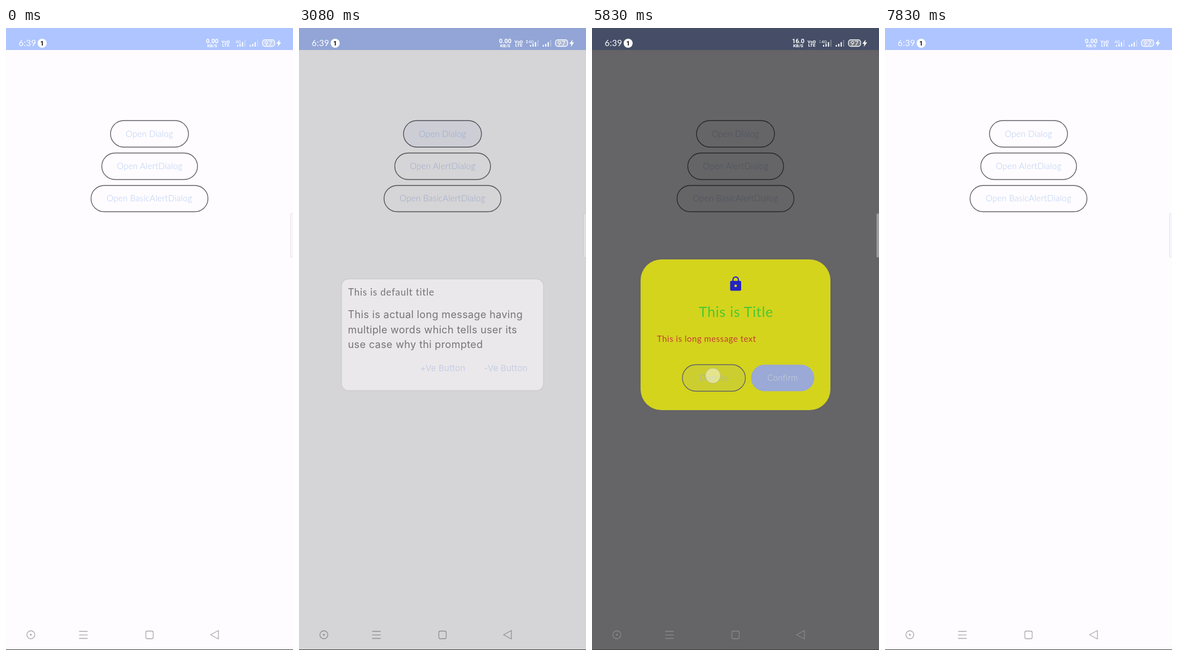
Write an HTML page that moves like this. It is 508 px wide and 1102 px high and loops after 8000 ms.

```html
<!DOCTYPE html>
<html lang="en">
<head>
<meta charset="utf-8">
<title>Dialogs</title>
<style>
  html, body { margin: 0; width: 100%; height: 100%; overflow: hidden; background: #fefcff; }
  svg { display: block; width: 508px; height: 1102px; }
  text { font: 300 15px Lato, "Open Sans", sans-serif; letter-spacing: .25px; }
  .mid { text-anchor: middle; }
  .label { fill: #b5caf1; }
  .title { font-size: 17px; font-weight: 400; letter-spacing: .75px; fill: #222126; }
  .body { font: 400 18px Inter, sans-serif; letter-spacing: .37px; fill: #252429; }
  .flat { font: 400 15px Inter, sans-serif; letter-spacing: .2px; fill: #b3c8f3; }
  .big { font-size: 25px; font-weight: 400; letter-spacing: .7px; fill: #40ee20; }
  .msg { letter-spacing: .5px; fill: #e53320; font-weight: 400; }
  .tiny { font: 700 8px Roboto, sans-serif; letter-spacing: 0; }
  .speed { font: 700 11px Roboto, sans-serif; letter-spacing: 0; }
  .line { fill: none; stroke: #626067; stroke-width: 1.4; }
  .nav { fill: none; stroke-width: 1.3; }
</style>
</head>
<body>
<svg id="stage" viewBox="0 0 508 1102"></svg>
<script>
const LOOP = 8000;
const stage = document.getElementById("stage");
const $ = id => document.getElementById(id);
const clamp = v => Math.max(0, Math.min(1, v));
const ramp = (t, start, length) => clamp((t - start) / length);

// x, y, width, height of every button
const buttons = {
  open: [185, 164, 138, 47],
  alert: [169.5, 221.5, 169.5, 47],
  basic: [150.5, 279, 207, 46.5],
  plus: [200, 579, 109, 48],
  minus: [313, 579, 107, 48],
  dismiss: [160, 596.5, 111.5, 47],
  confirm: [281.5, 596.5, 112, 47]
};

const pill = (name, attrs = "") => {
  const [x, y, w, h] = buttons[name];
  return `<rect x="${x}" y="${y}" width="${w}" height="${h}" rx="${h / 2}" ${attrs}/>`;
};
const text = (x, y, cls, str, attrs = "") =>
  `<text x="${x}" y="${y}" class="${cls}" ${attrs}>${str}</text>`;
const ripple = name =>
  `<clipPath id="clip-${name}">${pill(name)}</clipPath>
   <g clip-path="url(#clip-${name})"><circle id="ripple-${name}" fill="#8fb0ee" opacity="0"/></g>`;
const outlined = (name, label) => {
  const [x, y, w, h] = buttons[name];
  return ripple(name) + pill(name, 'class="line"') +
    text(x + w / 2, y + h / 2 + 5, "mid label", label);
};
const bars = (x, faint) => [3, 5, 8, 12].map((h, i) =>
  `<rect x="${x + i * 4.3}" y="${33 - h}" width="2" height="${h}" opacity="${i < faint ? 1 : .3}"/>`).join("");

const navIcons = `
  <circle cx="44" cy="1075" r="7"/><circle cx="44" cy="1075" r="1"/>
  <path d="M129.500 1069h15M129.500 1075.300h15M129.500 1081.500h15"/>
  <rect x="247.500" y="1068.500" width="13" height="13.500" rx="2.500"/>
  <path d="M376 1067.500V1082.500L362 1075Z" stroke-linejoin="round"/>`;

stage.innerHTML = `
  <rect width="508" height="1102" fill="#fefcff"/>
  <rect width="508" height="39" fill="#aec5ff"/>
  ${outlined("open", "Open Dialog")}
  ${outlined("alert", "Open AlertDialog")}
  ${outlined("basic", "Open BasicAlertDialog")}
  <g id="nav-dark" class="nav" stroke="#aaa8ad">${navIcons}</g>
  <rect id="dim" width="508" height="1102" opacity="0"/>
  <g id="nav-light" class="nav" stroke="#89888c">${navIcons}</g>

  <g id="card">
    <rect x="75" y="444.500" width="358" height="198" rx="13" fill="#fffafe" stroke="#c5c2c7" stroke-width="1.400"/>
    ${text(87, 474, "title", "This is default title")}
    ${text(86.5, 514, "body", "This is actual long message having")}
    ${text(86.5, 540.5, "body", "multiple words which tells user its")}
    ${text(86.5, 567, "body", "use case why thi prompted")}
    ${ripple("plus")}${ripple("minus")}
    ${text(254.5, 608, "mid flat", "+Ve Button")}
    ${text(366, 608, "mid flat", "-Ve Button")}
  </g>

  <g id="lockbox">
    <rect x="86" y="410" width="336" height="267" rx="37" fill="#ffff02"/>
    <rect x="244.500" y="448" width="19.500" height="17.500" rx="2" fill="#0c0ce6"/>
    <path d="M249.500 449v-3a4.800 4.800 0 0 1 9.600 0v3" fill="none" stroke="#0c0ce6" stroke-width="2.200"/>
    <circle cx="254.300" cy="456.700" r="2.300" fill="#ffff02"/>
    ${text(255, 512, "mid big", "This is Title")}
    ${text(115, 556, "msg", "This is long message text")}
    ${outlined("dismiss", "Dismiss")}
    ${pill("confirm", 'fill="#aec4ff"')}
    ${ripple("confirm")}
    ${text(337.5, 625, "mid", "Confirm", 'fill="#fff"')}
  </g>

  <circle id="touch" r="13.500" fill="#fff" fill-opacity=".45" stroke="#8e8ba8" stroke-opacity=".4"/>

  <g fill="#fff">
    ${text(22.5, 32, "", "6:39", 'style="font-weight:400"')}
    <circle cx="64" cy="27" r="8"/>
    ${text(64, 31, "mid speed", "1", 'fill="#000"')}
    <text id="speed" x="365" y="27" class="mid speed"></text>
    ${text(365, 34.3, "mid tiny", "KB/S")}
    ${text(389, 26.5, "mid tiny", "VoD")}
    ${text(389, 33.3, "mid tiny", "LTE")}
    <path id="arrows" d="M401.500 23.500l2-2.500 2 2.500zM401.500 25l2 2.500 2-2.500z"/>
    ${text(411, 27, "mid tiny", "4G", 'style="font-weight:400"')}
    ${bars(409, 3)}${bars(431.5, 3)}
    <rect x="454" y="21" width="21.500" height="11.500" rx="4" fill="#fff8d8" fill-opacity=".25" stroke="#fff" stroke-width="1.300"/>
    ${text(464.8, 31, "mid", "97", 'style="font-size:12px;font-weight:400"')}
    <path d="M484.500 20.500l-6 7.500h3.500l-1 5.500 6-8h-3.500z"/>
  </g>
  <rect x="503.500" y="328.500" width="6" height="78" rx="1.500" fill="#eeedf0" fill-opacity=".42" stroke="#000" stroke-opacity=".07"/>
  <rect y="1101" width="508" height="1" fill="#3c3b40"/>`;

// each showing of a dialog: when it opens and when it closes
const shows = [
  { id: "card", open: 1030, close: 2180 },
  { id: "card", open: 3000, close: 3760 },
  { id: "lockbox", open: 4780, close: 5790 },
  { id: "lockbox", open: 6555, close: 7480 }
];

// finger taps: button, place, press, release, end of the highlight
const taps = [
  ["open", 268, 190, 750, 960, 1110],
  ["plus", 260, 610, 2075, 2190, 2480],
  ["open", 268, 190, 2720, 2930, 3090],
  ["minus", 368, 608, 3670, 3780, 4060],
  ["alert", 282, 249, 4420, 4710, 4880],
  ["dismiss", 214, 616, 5670, 5850, 6090],
  ["alert", 282, 249, 6250, 6470, 6640],
  ["confirm", 338, 620, 7300, 7490, 7790]
];

function set(el, attrs) {
  for (const key in attrs) el.setAttribute(key, attrs[key]);
}

function draw(t) {
  const alpha = { card: 0, lockbox: 0 };
  let dim = 0, light = 0;
  for (const { id, open, close } of shows) {
    if (t < open || t > close + 310) continue;
    alpha[id] = ramp(t, open, 150) * (1 - ramp(t, close, 150));
    dim = .6 * ramp(t, open, 300) * (1 - ramp(t, close + 60, 250));
    light = ramp(t, open + 240, 80) * (1 - ramp(t, close + 60, 100));
  }
  for (const id in alpha) set($(id), { opacity: alpha[id] });
  set($("dim"), { opacity: dim });
  set($("nav-light"), { opacity: light });
  set($("nav-dark"), { opacity: 1 - light });

  for (const name in buttons) set($("ripple-" + name), { opacity: 0 });
  set($("touch"), { opacity: 0 });
  for (const [name, x, y, down, up, end] of taps) {
    if (t < down || t > end + 100) continue;
    const reach = buttons[name][2];
    set($("ripple-" + name), {
      cx: x, cy: y,
      r: 41 + (reach - 41) * ramp(t, down + 10, 220),
      opacity: .1 * (1 - ramp(t, end, 100))
    });
    const shown = t < down + 70 ? 0 : 1 - ramp(t, up, 80);
    set($("touch"), { cx: x, cy: y, opacity: shown });
  }

  $("speed").textContent = t >= 4420 && t < 7500 ? "16.0" : "0.00";
  set($("arrows"), { opacity: t < 330 || t >= 7500 ? 0 : t < 5250 ? .85 : .3 });
}

const start = performance.now();
function tick() {
  draw((performance.now() - start) % LOOP);
  requestAnimationFrame(tick);
}
tick();
</script>
</body>
</html>
```
